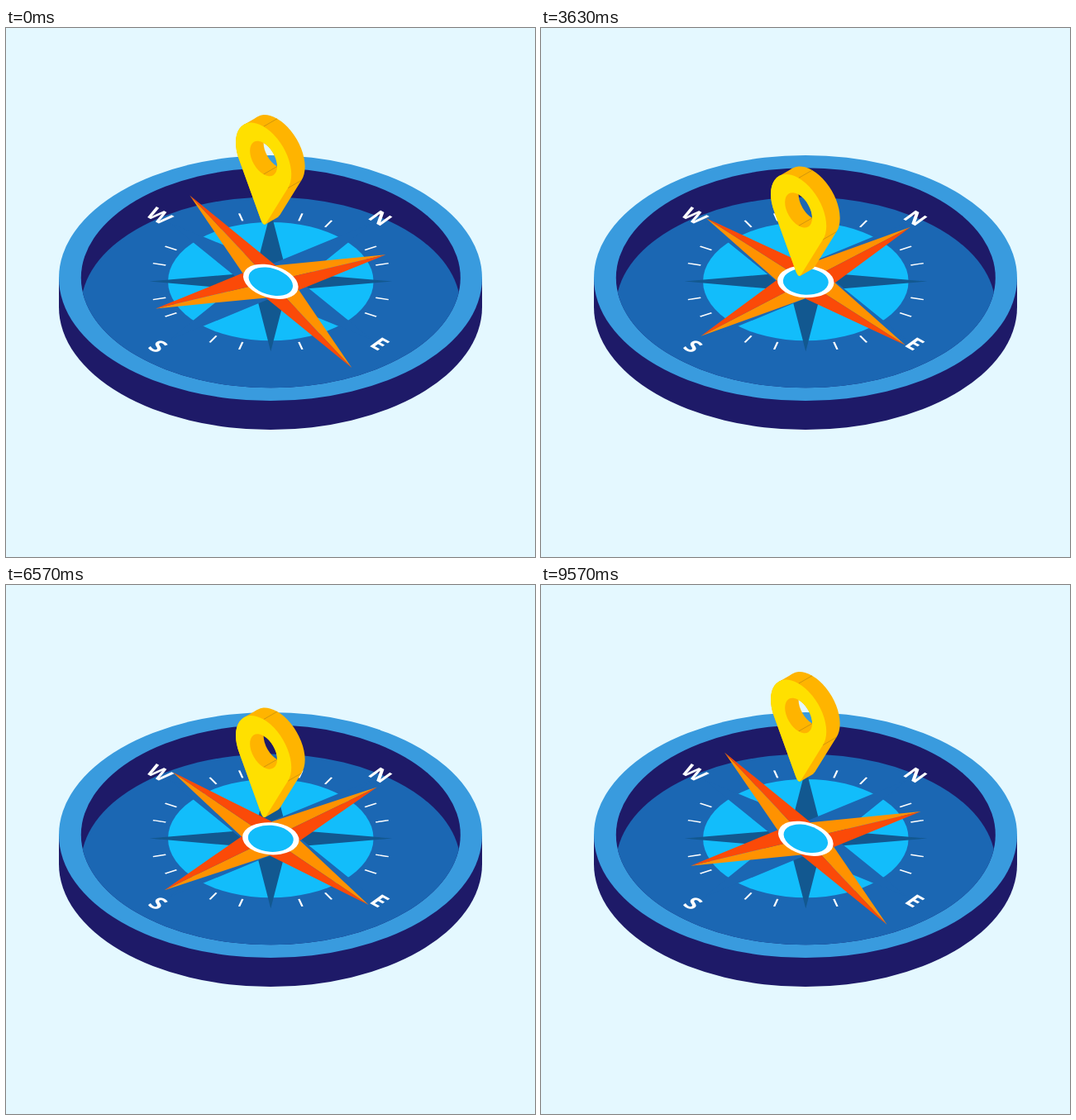
Write an HTML page that moves like this. It is 640 by 640 pixels and loops after 9610 ms.

```html
<!DOCTYPE html>
<html lang="en">
<head>
<meta charset="utf-8">
<title>Compass</title>
<style>
  html, body { margin: 0; width: 100%; height: 100%; overflow: hidden; background: #e4f8ff; }
  svg { display: block; width: 100%; height: 100%; }
  text { font: 700 26px "Open Sans", "Noto Sans", sans-serif; text-anchor: middle; fill: #fff; }
</style>
</head>
<body>
<svg viewBox="0 0 640 640">
  <defs>
    <clipPath id="bowl"><ellipse cx="320.3" cy="302.3" rx="229.5" ry="133"/></clipPath>
    <clipPath id="backHole"><circle cx="19" cy="-19" r="19"/></clipPath>
    <mask id="through" maskUnits="userSpaceOnUse" x="-60" y="-80" width="140" height="180">
      <rect x="-60" y="-80" width="140" height="180" fill="#fff"/>
      <circle r="19" clip-path="url(#backHole)"/>
    </mask>
  </defs>

  <path fill="#1e1a68" d="M64 302.5V337.5A256 148.5 0 0 0 576 337.5V302.5Z"/>
  <ellipse cx="320" cy="302.5" rx="256" ry="148.5" fill="#399bde"/>
  <g clip-path="url(#bowl)">
    <rect x="80" y="160" width="480" height="290" fill="#1e1a68"/>
    <ellipse cx="320.3" cy="337.5" rx="229.5" ry="133" fill="#1b67b3"/>
  </g>

  <g transform="translate(320.3 306.6) scale(1 .577)">
    <circle r="124.3" fill="#12bdfb"/>
    <path id="cardinal" fill="#125890"/>
    <path id="gap" fill="#1b67b3"/>
    <path id="ticks" stroke="#fff" stroke-width="2.4"/>
  </g>
  <g id="letters"></g>

  <g id="needle">
    <g id="arms" transform="scale(1 .577)"></g>
    <ellipse rx="34.3" ry="19.5" fill="#fff"/>
    <ellipse rx="27.5" ry="16" fill="#12bdfb"/>
  </g>

  <g id="pin">
    <g mask="url(#through)" fill="#ffb400">
      <path class="body" transform="translate(19 -19)"/>
      <path d="M-27.4 -27.4L-8.4 -46.4L20.8 60L1.8 79Z"/>
      <path class="body"/>
      <path d="M0 19L19 0M33.9 18.8L52.9 -.2M0 -38.8L19 -57.8" fill="none" stroke="#a87a18" stroke-width=".5"/>
    </g>
    <path id="face" fill="#ffe000" fill-rule="evenodd"/>
  </g>
</svg>
<script>
const LOOP = 9610, TURN = 4800;
const $ = id => document.getElementById(id);
const make = (tag, parent, attrs) => {
  const el = document.createElementNS('http://www.w3.org/2000/svg', tag);
  for (const k in attrs) el.setAttribute(k, attrs[k]);
  return parent.appendChild(el);
};
const polar = (r, deg) => {
  const a = deg * Math.PI / 180;
  return (r * Math.cos(a)).toFixed(2) + ' ' + (r * Math.sin(a)).toFixed(2);
};
const QUARTERS = [0, 90, 180, 270];

// Four-pointed star: tips at `start`, notches 45 degrees further on
const star = (tip, notch, start) => 'M' + QUARTERS
  .map(q => polar(tip, q + start) + 'L' + polar(notch, q + start + 45)).join('L') + 'Z';

const TIP = 175.2, NOTCH = 35.5;
$('cardinal').setAttribute('d', star(147, 26.9, 0));
$('gap').setAttribute('d', star(TIP, NOTCH, 45));
$('ticks').setAttribute('d', QUARTERS.flatMap(q => [15, 30, 60, 75]
  .map(a => `M${polar(131.5, q + a)}L${polar(147.5, q + a)}`)).join(''));

for (const q of QUARTERS) {
  for (const [side, fill] of [[-45, '#ff9200'], [45, '#fb4a08']]) {
    make('path', $('arms'), { fill, d: `M0 0L${polar(TIP, q + 45)}L${polar(NOTCH, q + 45 + side)}Z` });
  }
}

for (const [ch, x, y] of [['W', 185.5, 227.5], ['N', 453, 230], ['E', 452, 382], ['S', 183.8, 385]]) {
  make('text', $('letters'), { y: 9.3, transform: `matrix(.87 .48 -.8 .58 ${x} ${y})` }).textContent = ch;
}

const body = 'M-33.9 18.8A38.8 38.8 0 1 1 33.9 18.8L4 75.5Q0 83 -4 75.5Z';
document.querySelectorAll('.body').forEach(p => p.setAttribute('d', body));
$('face').setAttribute('d', body + 'M-19 0A19 19 0 1 0 19 0A19 19 0 1 0 -19 0Z');

const clamp = v => Math.min(1, Math.max(0, v));
const smooth = s => s * s * (3 - 2 * s);
// Bezier easing with flat ends; x1 and x2 set the handle lengths
function ease(x, x1, x2) {
  let lo = 0, hi = 1;
  for (let i = 0; i < 24; i++) {
    const s = (lo + hi) / 2, r = 1 - s;
    if (3 * r * r * s * x1 + 3 * r * s * s * x2 + s * s * s < x) lo = s; else hi = s;
  }
  return smooth(lo);
}

function draw(t) {
  const rise = smooth(clamp(t / TURN));
  const drop = rise - ease(clamp((t - TURN) / TURN), .167, .667);
  const swing = rise - smooth(clamp((t - 5040) / 4750));
  $('pin').setAttribute('transform', `matrix(.866 .5 0 1 311.6 ${158 + 73.3 * drop})`);
  $('needle').setAttribute('transform', `translate(320.3 306.8) rotate(${16.8 * (1 - swing)})`);
}

const begin = performance.now();
function tick() {
  draw((performance.now() - begin) % LOOP);
  requestAnimationFrame(tick);
}
tick();
</script>
</body>
</html>
```
